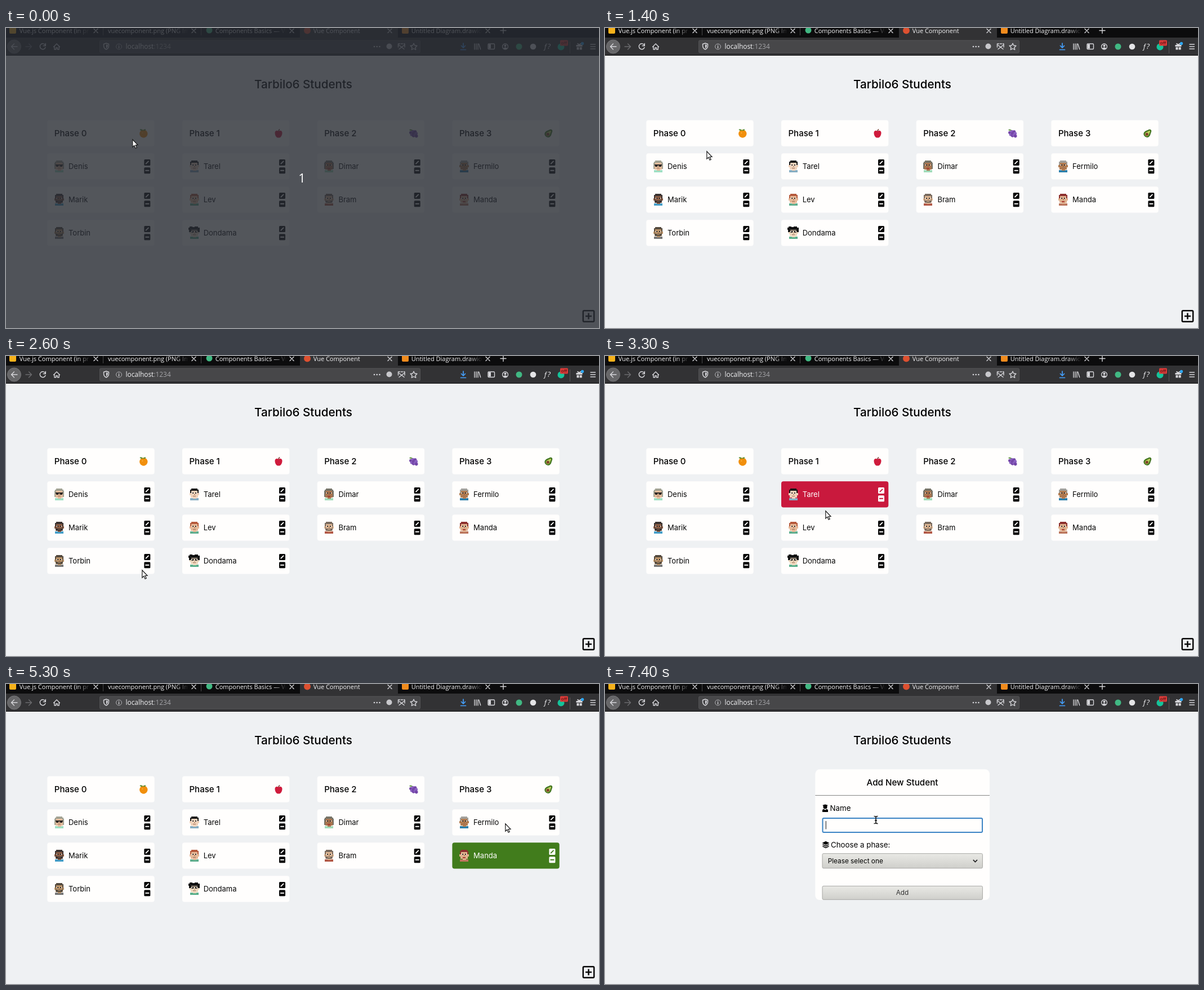
Animation, 1053 px wide and 532 px high, one loop 8000 ms. Source, as an HTML page:

```html
<!DOCTYPE html>
<html lang="en">
<head>
<meta charset="utf-8">
<title>Vue Component</title>
<style>
html, body { margin: 0; width: 100%; height: 100%; overflow: hidden; background: #eff1f3; }
svg { display: block; width: 100%; height: 100%; }
text { font-family: Inter, sans-serif; white-space: pre; }
.ui { font-family: "Open Sans", sans-serif; font-size: 11px; fill: #f4f4f6; }
.line { fill: none; stroke: #d7d7db; stroke-width: 1.4; stroke-linecap: round; stroke-linejoin: round; }
.panel { fill: #fffefd; }
.title { font-size: 20.6px; font-weight: 500; text-anchor: middle; }
.phase { font-size: 15px; font-weight: 500; }
.name { font-size: 13px; }
.ink { fill: #060606; }
.cut { stroke: #fffefd; fill: none; stroke-width: 1.9; stroke-linecap: round; }
.on .panel { fill: var(--tint); }
.on .ink { fill: #fffefd; }
.on .cut { stroke: var(--tint); }
.label { font-size: 13.3px; }
.small { font-size: 11.8px; }
</style>
</head>
<body>
<svg id="stage" viewBox="0 0 1053 532" preserveAspectRatio="none"></svg>
<script>
const LOOP = 8000;

const rect = (x, y, w, h, fill, r = 0, extra = '') =>
  `<rect x="${x}" y="${y}" width="${w}" height="${h}" rx="${r}" fill="${fill}" ${extra}/>`;
const dot = (x, y, r, fill, extra = '') => `<circle cx="${x}" cy="${y}" r="${r}" fill="${fill}" ${extra}/>`;
const text = (x, y, cls, s, extra = '') => `<text x="${x}" y="${y}" class="${cls}" ${extra}>${s}</text>`;
const line = (d, extra = '') => `<path class="line" d="${d}" ${extra}/>`;
const group = (x, y, body, extra = '') => `<g transform="translate(${x} ${y})" ${extra}>${body}</g>`;

// Browser window

const tabs = [
  { x: 0, label: 'Vue.js Component (in pr', icon: rect(6, -2, 12, 12, '#f6b21b', 2) },
  { x: 174, label: 'vuecomponent.png (PNG Im' },
  { x: 348, label: 'Components Basics — Vu', icon: dot(361, 4, 5.5, '#41b883') },
  { x: 522, label: 'Vue Component', icon: dot(535, 4.5, 6, '#dd5030'), active: true },
  { x: 696, label: 'Untitled Diagram.drawio', icon: rect(703, -2, 12, 12, '#f08b1d', 2) }
];

function drawTab({ x, label, icon = '', active }) {
  const tint = active ? '#323234' : '#0c0c0d';
  const start = x + (icon ? 23.7 : 7);
  return rect(x, 0, 174, 17, tint)
    + icon + text(start, 9, 'ui', label)
    + rect(x + 126, 0, 24, 16, `url(#${active ? 'fadeActive' : 'fade'})`)
    + rect(x + 150, 0, 23, 16, tint)
    + line(`M${x + 156} 1.5l7 7m0 -7l-7 7`)
    + (x === 0 || x === 174 ? rect(x + 172, 0, 1, 13, '#49494b') : '');
}

function drawToolbar() {
  return rect(0, 17, 1053, 31, '#323234') + rect(0, 48, 1053, 1, '#0c0c0d')
    + dot(14.5, 33, 12, '#676769', 'stroke="#77777a"')
    + line('M20 33H9.5m5 -5l-5 5l5 5')
    + line('M35 33h10.5m-5 -5l5 5l-5 5', 'stroke-opacity=".35"')
    + line('M69.8 30.5a5 5 0 1 0 .3 3.8M70.3 27.5v4h-4')
    + line('M84.5 33.5l5.5 -5.5l5.5 5.5m-9.5 -.8v5.3h2.8v-3h2.6v3h2.8v-5.3')
    + rect(166.5, 22, 569, 22, '#474749', 2, 'stroke="#5b5b5e" stroke-width=".8"')
    + line('M173.5 28.5l4.5 -1.5l4.5 1.5v3c0 3 -2 5.5 -4.5 6.5c-2.5 -1 -4.5 -3.5 -4.5 -6.5z')
    + '<path d="M178 29v7c1.8 -1 2.8 -3 2.8 -5v-1z" fill="#d7d7db"/>'
    + dot(200.5, 33, 4.9, 'none', 'stroke="#b4b4b8"') + line('M200.5 32.5v3M200.5 30.4v.1', 'stroke-width="1.1"')
    + text(212.5, 37, 'ui', 'localhost<tspan fill="#a3a3a7">:1234</tspan>', 'style="font-size:11.9px"')
    + [654, 658.7, 663.4].map(x => dot(x, 33, 1.3, '#d7d7db')).join('')
    + dot(680.5, 32.5, 5, '#c8c8cc')
    + line('M696.5 34v-6h3m2 0h3m2 0h1.5v6M698 37.5l9 -7m-9 0l9 7', 'stroke-width="1.2"')
    + line('M724 27.2l1.8 3.8l4.1 .5l-3 2.9l.8 4.1l-3.7 -2l-3.7 2l.8 -4.1l-3 -2.9l4.1 -.5z')
    + line('M812 27v8m-3.5 -3.5l3.5 3.5l3.5 -3.5M807.5 38.5h9', 'style="stroke:#45a1ff;stroke-width:1.7"')
    + line('M832 28v10m3 -10v10m3 -10v10m1.7 -9.8l3 9.5')
    + rect(856, 28, 11.5, 9.5, 'none', 1.5, 'stroke="#d7d7db" stroke-width="1.4"') + rect(857, 29, 4, 7.5, '#d7d7db')
    + dot(886.5, 33, 5, 'none', 'stroke="#d7d7db" stroke-width="1.3"') + dot(886.5, 31.5, 2, '#d7d7db')
    + '<path d="M883 35.8q3.5 -3 7 0q-3.5 3 -7 0" fill="#d7d7db"/>'
    + dot(911, 33, 5.5, '#41b883') + dot(936, 33, 5.3, '#e4e4e6')
    + text(954.5, 37, 'ui', 'ƒ?', 'font-style="italic" style="font-size:12.5px"')
    + dot(985.5, 33.5, 6, '#15c39a')
    + rect(984, 21.5, 14, 10, '#d93a38', 1.5)
    + text(991, 29.4, 'ui', 'off', 'text-anchor="middle" style="font-size:8px;fill:#2b0707"')
    + rect(1001, 24, 1, 21, '#58585b')
    + rect(1012.5, 30, 11, 3, '#d7d7db') + rect(1013.5, 34, 4, 4.5, '#d7d7db') + rect(1018.7, 34, 4, 4.5, '#d7d7db')
    + line('M1018 29.5c-5 -4 -3 0 0 0c3 0 4 -4 0 0') + dot(1023.5, 27.5, 2.7, '#2fa8f5')
    + line('M1038 29h8.5m-8.5 4h8.5m-8.5 4h8.5');
}

// Student board

const fruits = [
  dot(0, 0.5, 7.2, '#f18f0c') + '<path d="M-1 -5q-4 1 -6 -2q4 -2 6 2q3 -4 5 -2q-1 3 -5 2" fill="#5c913b"/>'
    + dot(-2, -1, 1, '#fbb547'),
  '<path d="M0 -4c3 -2 6.500 -1 6.500 3c0 4 -2.500 8.500 -5 8.500h-3c-2.500 0 -5 -4.500 -5 -8.500c0 -4 3.500 -5 6.500 -3" fill="#cf1b3c"/>'
    + '<path d="M0 -4q0 -2 2 -3.500" stroke="#662113" stroke-width="1.300" fill="none"/>',
  '<path d="M-7 -6q4 -1 7 3" stroke="#5c913b" stroke-width="2" fill="none"/>'
    + [[-4.8, -1.5], [-1, -3.2], [2.8, -3], [-3.2, 2], [0, 0], [4.6, 0], [0, 4], [2.7, 3], [5, 4.6]]
      .map(([x, y], i) => dot(x, y, 2.8, i % 2 ? '#8a5fc0' : '#7346a7')).join(''),
  '<g transform="rotate(42)"><path d="M0 -8.800c3 0 3.200 3.500 4.600 6c3.200 6 0 10 -4.600 10s-7.800 -4 -4.600 -10c1.400 -2.500 1.600 -6 4.600 -6" fill="#3e721d"/>'
    + '<path d="M0 -6.500c1.500 0 1.700 3 2.600 4.800c2.300 4.500 0 7 -2.600 7s-4.900 -2.500 -2.600 -7c.9 -1.800 1.100 -4.800 2.600 -4.800" fill="#b9cc5c"/></g>'
    + dot(-1.2, 1.4, 2.7, '#81472c')
];

// Each student: name, hair, skin, shirt, features
const phases = [
  { tint: '#ef8e0c', students: [
    ['Denis', '#a3a394', '#e3bc9c', '#9fe0c4', 'long shades'],
    ['Marik', '#3a3230', '#8a5c44', '#459fca', 'beard'],
    ['Torbin', '#544a3e', '#bd956a', '#777777', 'beard']] },
  { tint: '#c9193d', students: [
    ['Tarel', '#161616', '#f0d2ba', '#86adc2', ''],
    ['Lev', '#b65a3c', '#e6b998', '#5fae8e', ''],
    ['Dondama', '#121212', '#eed9be', '#5bb08c', 'wild glasses']] },
  { tint: '#7040a0', students: [
    ['Dimar', '#777468', '#a9754f', '#a1dcba', 'long mouth'],
    ['Bram', '#786a5e', '#dcb491', '#b25846', 'beard']] },
  { tint: '#417c1c', students: [
    ['Fermilo', '#a2a09b', '#b17b50', '#2c7fab', ''],
    ['Manda', '#8d302e', '#dfb08d', '#bb765d', 'mouth']] }
];

function drawAvatar(hair, skin, shirt, features) {
  const has = f => features.includes(f);
  const dark = '#2b2624';
  const px = (x, y, w, h, fill) => rect(x, y, w, h, fill, 0, 'shape-rendering="crispEdges"');
  return px(1, 17, 15, 4, shirt) + px(6, 15, 6, 3, skin)
    + px(2, 2, 13, 14, skin) + px(0, 8, 17, 4, skin)
    + (has('wild') ? px(-2, 1, 20, 4, hair) + px(-1, 4, 3, 5, hair) + px(15, 4, 3, 5, hair)
      + px(0, -1, 5, 2, hair) + px(9, -1, 6, 2, hair) : '')
    + px(3, 0, 11, 2, hair) + px(1, 2, 15, 2, hair) + px(1, 4, 2, 4, hair) + px(14, 4, 2, 4, hair)
    + (has('long') ? px(0, 4, 2, 11, hair) + px(15, 4, 2, 11, hair) : '')
    + (has('beard') ? px(3, 12, 11, 4, hair) + px(2, 9, 1, 5, hair) + px(14, 9, 1, 5, hair) + px(6, 13, 5, 1, skin) : '')
    + (has('shades') ? px(2, 7, 13, 2, dark) + px(3, 8, 4, 3, dark) + px(10, 8, 4, 3, dark)
      : px(4, 7, 3, 2, '#fff') + px(10, 7, 3, 2, '#fff') + px(5, 7, 2, 2, dark) + px(10, 7, 2, 2, dark))
    + (has('glasses') ? px(3, 6, 11, 1, dark) + px(3, 9, 4, 1, dark) + px(10, 9, 4, 1, dark) : '')
    + px(8, 10, 2, 1, '#8c6047')
    + (has('beard') ? '' : px(6, 13, 5, has('mouth') ? 2 : 1, has('mouth') ? '#a83a30' : '#9a6a54'));
}

function drawCard([name, ...look], x, row, id) {
  const y = 222.3 + 59 * row;
  return group(x, y, rect(0, 0, 190.3, 46.2, '', 4, 'class="panel"')
    + group(12.5, 13, drawAvatar(...look))
    + text(37.7, 28, 'name ink', name)
    + rect(172, 10.6, 11, 11, '', 1.5, 'class="ink"') + '<path class="cut" d="M175.300 18.400l4.300 -4.300"/>'
    + rect(172, 25, 11, 11, '', 1.5, 'class="ink"') + '<path class="cut" d="M174.800 30.500h5.400"/>', `id="${id}"`);
}

const board = phases.map(({ tint, students }, col) => {
  const x = 73.3 + 239.7 * col;
  return `<g style="--tint:${tint}">` + rect(x, 163.6, 190.3, 46.2, '', 4, 'class="panel"')
    + text(x + 12.5, 192, 'phase', 'Phase ' + col) + group(x + 171, 187, fruits[col])
    + students.map((s, row) => drawCard(s, x, row, `card${col}-${row}`)).join('') + '</g>';
}).join('')
  + rect(1024.8, 501.3, 19.4, 19.4, 'none', 1.8, 'stroke="#080808" stroke-width="2.5"')
  + '<path d="M1034.500 505.500v11m-5.500 -5.500h11" stroke="#080808" stroke-width="2.500"/>';

// Form

const form = rect(373.3, 151.3, 309.7, 231.7, '', 8, 'class="panel"') + rect(373.3, 197, 309.7, 1, '#858585')
  + text(528, 180, 'phase', 'Add New Student', 'text-anchor="middle" style="font-size:15.2px"')
  + '<path d="M386 215l5 -1.500l5 1.500l-1.500 .8v2.200a3.500 3.500 0 0 1 -7 0v-2.200zM386 227v-2.500q0 -2.500 2.800 -2.800l2.200 2l2.200 -2q2.800 .3 2.800 2.800v2.500z"/>'
  + text(399.5, 225, 'label', 'Name')
  + rect(386.5, 238, 283.5, 25, '#fffefd', 2, 'id="field"')
  + rect(391.8, 243, 1, 14.5, '#111', 0, 'id="caret"')
  + '<path d="M385.500 282l6.500 -3.200l6.500 3.200l-6.500 3.200zM385.500 285l2 -.8l4.500 2.200l4.500 -2.200l2 .8l-6.500 3.200zM385.500 288l2 -.8l4.500 2.200l4.500 -2.200l2 .8l-6.500 3.200z"/>'
  + text(401, 290, 'label', 'Choose a phase:')
  + rect(386, 300.7, 284.4, 26, 'url(#button)', 2, 'stroke="#a7a7a4"')
  + text(395.7, 318, 'small', 'Please select one')
  + '<path d="M653.800 311.800l3.600 3.800l3.600 -3.800" fill="none" stroke="#222" stroke-width="1.700"/>'
  + rect(386, 358.3, 284.4, 24, 'url(#button)', 2, 'stroke="#a7a7a4"')
  + text(528, 374, 'small', 'Add', 'text-anchor="middle" fill="#333"');

const gradient = (id, from, to, axis = '') =>
  `<linearGradient id="${id}" ${axis}><stop stop-color="${from}"/><stop offset="1" stop-color="${to}"/></linearGradient>`;

const stage = document.getElementById('stage');
stage.innerHTML = '<defs>' + gradient('fade', '#0c0c0d00', '#0c0c0d') + gradient('fadeActive', '#32323400', '#323234')
  + gradient('button', '#e9e9e5', '#cfcfcb', 'x2="0" y2="1"') + '</defs>'
  + rect(0, 0, 1053, 532, '#eff1f3') + rect(0, 0, 1053, 17, '#0c0c0d')
  + tabs.map(drawTab).join('') + line('M878 4.500h10m-5 -5v10') + drawToolbar()
  + text(528, 107, 'title', 'Tarbilo6 Students')
  + `<g id="board">${board}</g><g id="form">${form}</g>`
  + '<g id="countdown">' + rect(0, 0, 1053, 532, '#282c34', 0, 'opacity=".8"')
  + text(525.5, 274, 'ui', '1', 'text-anchor="middle" style="font-size:22px;fill:#fff"') + '</g>'
  + '<path id="arrow" d="M.8 .8v13.300l3 -2.800l2.200 4.900l2.200 -1l-2.200 -4.700h4z" fill="#fff" stroke="#1b1b1b" stroke-width="1.200"/>'
  + '<path id="beam" d="M-3.500 -6.500q3.500 0 3.500 1.500q0 -1.500 3.500 -1.500M0 -5v10M-3.500 6.500q3.500 0 3.500 -1.500q0 1.500 3.500 1.500M-2 1h4" fill="none" stroke="#161616" stroke-width="1.600"/>';

// Timeline: every row holds until the next one

const pointer = [
  [0, 224, 197], [200, 261, 206], [500, 489, 258], [800, 380, 240], [900, 240, 238], [1000, 200, 232],
  [1200, 192, 212], [1300, 186, 203], [1400, 180, 218], [1500, 178, 235], [1600, 176, 250], [1700, 175, 272],
  [1800, 178, 290], [1900, 182, 298], [2000, 186, 305], [2100, 192, 310], [2200, 200, 314], [2300, 210, 320],
  [2400, 222, 330], [2500, 232, 336], [2600, 241, 379], [2700, 300, 370], [2800, 380, 362], [2900, 400, 350],
  [3000, 410, 322], [3100, 412, 334], [3300, 391, 274], [3500, 440, 245], [3600, 494, 222], [3800, 560, 230],
  [3900, 640, 240], [4000, 660, 262], [4300, 638, 268], [4400, 700, 262], [4500, 790, 258], [4600, 850, 262],
  [4700, 880, 290], [4900, 885, 270], [5000, 884, 300], [5300, 886, 247], [5500, 1005, 468], [5800, 1028, 501],
  [6800, 860, 430], [6900, 688, 358], [7100, 620, 310], [7200, 545, 270], [7300, 481, 241]
];

const hover = [
  [0], [800, '1-0'], [1000, '0-0'], [1300], [1600, '0-0'], [1800], [1900, '0-1'], [2500], [2700, '0-2'], [2800],
  [2900, '1-2'], [3100, '1-1'], [3300, '1-0'], [3900], [4000, '2-0'], [4300, '2-1'], [4400, '2-0'], [4500],
  [4700, '3-0'], [4900, '3-1'], [5000, '3-0'], [5300, '3-1'], [5500]
];

const FORM_AT = 6000, BEAM_AT = 7300, FOCUS_AT = 7400;
const el = id => document.getElementById(id);
const show = (id, visible) => el(id).setAttribute('display', visible ? 'inline' : 'none');
const at = (table, t) => table.findLast(row => row[0] <= t);

function render(t) {
  const [, x, y] = at(pointer, t);
  const [, card] = at(hover, t);
  for (const id of ['arrow', 'beam']) el(id).setAttribute('transform', `translate(${x} ${y})`);
  stage.querySelectorAll('.on').forEach(c => c.classList.remove('on'));
  if (card) el('card' + card).classList.add('on');
  show('countdown', t < 100);
  show('board', t < FORM_AT);
  show('form', t >= FORM_AT);
  show('arrow', t < BEAM_AT);
  show('beam', t >= BEAM_AT);
  const focused = t >= FOCUS_AT;
  show('caret', focused);
  el('field').setAttribute('stroke', focused ? '#3b83c4' : '#b0b0ae');
  el('field').setAttribute('stroke-width', focused ? 2 : 1);
}

const start = performance.now();
function tick() {
  render((performance.now() - start) % LOOP);
  requestAnimationFrame(tick);
}
tick();
</script>
</body>
</html>
```
